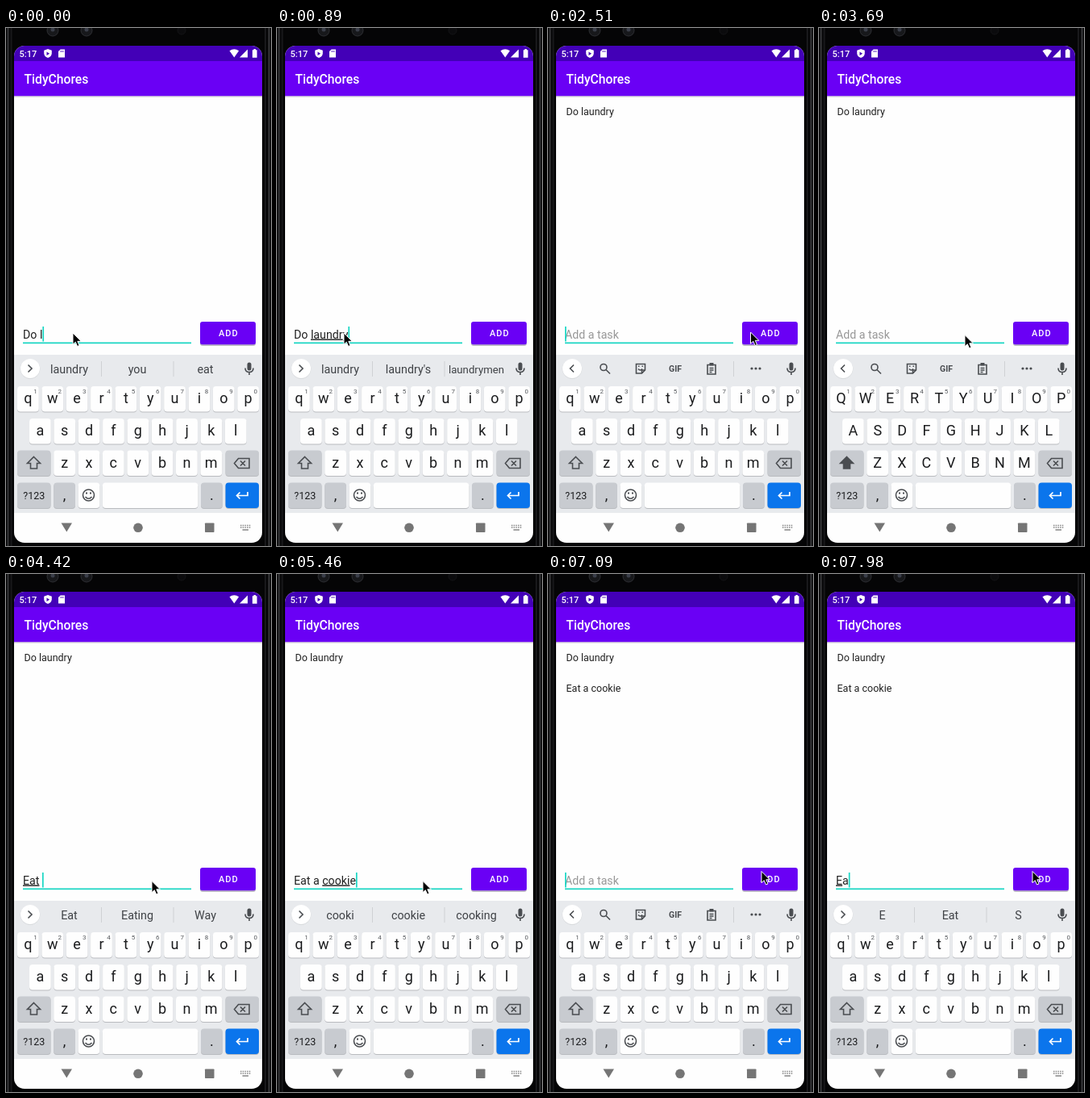
These frames come from a looping animation (329 px wide and 642 px high, 8000 ms). An HTML page:

```html
<!DOCTYPE html>
<html lang="en">
<head>
<meta charset="utf-8">
<title>To-do list demo</title>
<style>
  html, body { margin: 0; width: 100%; height: 100%; overflow: hidden; background: #000; }
  svg { display: block; width: 329px; height: 642px; font-family: Roboto, Arial, sans-serif; }
  text { white-space: pre; }
  .mid { text-anchor: middle; }
  .medium { font-weight: 500; }
  .under { text-decoration: underline; text-decoration-thickness: 1px; text-decoration-skip-ink: none; }
  .line { fill: none; stroke: #4a4d51; stroke-width: 1.6; }
  .key { font-size: 18px; fill: #1b1c1e; }
  .hint { font-size: 8px; fill: #55585c; }
  .word { font-size: 14.3px; fill: #3f4246; }
</style>
</head>
<body>
<svg viewBox="0 0 329 642">
  <defs>
    <clipPath id="screenClip"><rect x="10" y="22" width="308" height="616" rx="13"/></clipPath>
    <clipPath id="buttonClip"><rect x="241" y="364" width="69" height="28.5" rx="3"/></clipPath>
  </defs>

  <!-- phone body -->
  <rect width="329" height="642" fill="#050506"/>
  <path d="M2.5 0V642M326.5 0V642" stroke="#38393b" stroke-width="2"/>
  <path d="M6.5 0V642M322 0V642" stroke="#19191b" stroke-width="2"/>
  <g fill="#17181b" stroke="#2e2f33">
    <circle cx="58" cy="3" r="7"/><circle cx="100" cy="3" r="7"/>
    <circle cx="218" cy="3" r="5" fill="#0b0b0d" stroke="#141416"/>
  </g>
  <g fill="#3a3e49"><circle cx="58" cy="2" r="2.5"/><circle cx="100" cy="2" r="2.5"/></g>

  <g clip-path="url(#screenClip)">
    <rect x="10" y="22" width="308" height="616" fill="#fefefe"/>
    <rect x="10" y="22" width="308" height="19.5" fill="#4300b7"/>
    <rect x="10" y="41" width="308" height="43.5" fill="#6a00f5"/>
    <rect x="10" y="84.5" width="308" height="1" fill="#c9c5d0"/>

    <!-- status bar -->
    <g fill="#fff">
      <text x="16.5" y="35.5" font-size="11" class="medium">5:17</text>
      <path d="M52 26l4.8 1.8v3.4q0 4-4.8 5.8q-4.8-1.8-4.8-5.8v-3.4z"/>
      <path d="M67.600 26.500h5.400v10h-8v-7.400z"/>
      <path d="M277.500 28.300q5.800-4.300 11.600 0l-5.800 8.200z"/>
      <path d="M300 26.500v10h-10z"/>
      <path d="M307.500 26h2.500v1.200h1.600v9.600h-5.700v-9.600h1.600z"/>
    </g>
    <path d="M50.500 29.500l3.600 2.200-3.600 2.200z" fill="#4300b7"/>
    <path d="M67.800 28v2M69.500 28v2M71.200 28v2" stroke="#4300b7" stroke-width=".7"/>
    <text x="22.500" y="69" font-size="15.700" class="medium" fill="#fff">TidyChores</text>

    <!-- list and input -->
    <g font-size="12.500" fill="#212121">
      <text id="item1" x="22.500" y="108">Do laundry</text>
      <text id="item2" x="22.500" y="146">Eat a cookie</text>
    </g>
    <text id="placeholder" x="21" y="384.500" font-size="14.200" fill="#989898">Add a task</text>
    <text id="entry" x="21" y="384.500" font-size="14.200" fill="#212121"></text>
    <rect x="21" y="389.500" width="209" height="1.700" fill="#16d6c3"/>
    <rect id="caret" y="370" width="1.700" height="18.500" fill="#16d6c3"/>

    <rect id="shade" x="241" y="365.500" width="69" height="28.500" rx="3" fill="#bdbac4"/>
    <g clip-path="url(#buttonClip)">
      <rect x="241" y="364" width="69" height="28.500" fill="#6a00f5"/>
      <circle id="ripple" cy="378" fill="#fff" opacity=".24"/>
    </g>
    <text x="264" y="382.300" font-size="11" letter-spacing="1" class="medium" fill="#fff">ADD</text>

    <!-- keyboard -->
    <rect x="10" y="405" width="308" height="196" fill="#e8eaed"/>
    <circle cx="30" cy="422.500" r="12.300" fill="#d5d7da"/>
    <circle cx="30" cy="422" r="12" fill="#fff"/>
    <path id="chevron" class="line"/>
    <g id="words">
      <path d="M118.500 413v19M208 413v19" stroke="#cfd1d4"/>
      <text class="word mid" x="78.500" y="427.500"></text>
      <text class="word mid" x="163" y="427.500"></text>
      <text class="word mid" x="247.500" y="427.500"></text>
      <g id="cookie">
        <circle cx="163.300" cy="422.500" r="8" fill="#d99a52"/>
        <g fill="#754321">
          <circle cx="160" cy="419" r="1.500"/><circle cx="165" cy="417.500" r="1.200"/>
          <circle cx="167.500" cy="422" r="1.500"/><circle cx="162.500" cy="423.500" r="1.400"/>
          <circle cx="158.500" cy="425" r="1.100"/><circle cx="165" cy="427.500" r="1.400"/>
        </g>
      </g>
    </g>
    <g id="tools">
      <g class="line">
        <circle cx="69" cy="420.500" r="4"/><path d="M72 423.500l5 5"/>
        <path d="M109.500 416.500h11v7.500l-4 4h-7zM120.500 424h-4v4M112 422.500q2.500 3 5 0"/>
        <path d="M198 417.500h10v11.500h-10zM200.500 421.500h5M200.500 424h5M200.500 426.500h3"/>
      </g>
      <path d="M112 418.500h1.500v1.500h-1.500zM116.500 418.500h1.500v1.500h-1.500zM200.500 415h5v3.500h-5z" fill="#4a4d51"/>
      <text class="mid" x="158" y="426" font-size="10.500" font-weight="700" fill="#4a4d51">GIF</text>
      <path d="M230.500 413v19" stroke="#cfd1d4"/>
      <g fill="#4a4d51"><circle cx="253" cy="422" r="1.600"/><circle cx="258" cy="422" r="1.600"/><circle cx="263" cy="422" r="1.600"/></g>
    </g>
    <rect x="299.500" y="414.500" width="5" height="10" rx="2.500" fill="#4a4d51"/>
    <path class="line" d="M297 421.500q0 5 5 5q5 0 5-5M302 426.500v3.500"/>

    <g id="keys"></g>
    <path id="shift" class="line" d="M34.500 531.500l8 8h-4v6.500h-8v-6.500h-4z"/>
    <path class="line" d="M288.500 533.500h13.500v12h-13.500l-5-6zM291 536.500l6 6M297 536.500l-6 6"/>
    <g class="line"><circle cx="102.500" cy="579" r="7"/><path d="M98.500 581q4 4.500 8 0"/></g>
    <path d="M99 575.500h2v2h-2zM104 575.500h2v2h-2z" fill="#4a4d51"/>
    <path d="M300 575v4.500h-13M290.500 575.500l-4 4 4 4" fill="none" stroke="#fff" stroke-width="1.700"/>

    <!-- navigation bar -->
    <g fill="#757575">
      <path d="M68.500 613.500h13.500l-6.700 11z"/>
      <circle cx="164" cy="619.300" r="5.800"/>
      <rect x="247" y="613.500" width="11.500" height="11.500" rx=".7"/>
    </g>
    <path d="M291 616.500h12.500M291 619h12.500" stroke="#858585" stroke-width="1.500" stroke-dasharray="1.500 1.200"/>
    <path d="M293.500 622h7.500" stroke="#858585" stroke-width="1.500"/>
  </g>

  <path id="pointer" d="M0 0V14.200L3.300 11.200 5.600 16.500 8 15.500 5.800 10.300H10.300Z" fill="#000" stroke="#fff" stroke-width="1"/>
</svg>

<script>
const LOOP = 8000;
const $ = id => document.getElementById(id);

// Underscores enclose the part the keyboard is composing.
const typing = [
  [0, 'Do l'], [150, 'Do _l_a'], [290, 'Do _la_u'], [440, 'Do _lau_n'],
  [590, 'Do _laun_d'], [740, 'Do _laund_r'], [880, 'Do _laundr_y'], [1030, 'Do _laundry_'],
  [2210, ''], [3840, 'E'], [3980, '_E_a'], [4270, '_Ea_t'], [4420, '_Eat_ '],
  [4570, 'Eat a'], [4720, 'Eat _a_ '], [4870, 'Eat a c'], [5010, 'Eat a _c_o'],
  [5160, 'Eat a _coo_k'], [5310, 'Eat a _cook_i'], [5460, 'Eat a _cooki_e'],
  [5610, 'Eat a _cookie_'], [6940, ''], [7830, 'E'], [7980, '_E_a']
];

// An empty string shows the toolbar; an asterisk is the cookie emoji.
const suggestions = [
  [0, 'laundry you eat'], [150, 'l let love'], [290, 'la last lab'], [440, 'lau laundry laugh'],
  [590, 'laun laundry launch'], [740, 'laund laundry launder'], [880, "laundry laundry's laundrymen"],
  [2510, ''], [3980, 'E Eat S'], [4270, 'Ea Eat East'], [4420, 'Eat Eating Way'],
  [4570, 'at the a'], [4720, 'a A at'], [4870, 'lot little good'], [5010, 'c can cake'],
  [5160, 'co come cookie'], [5310, 'cook cookie cooking'], [5460, 'cooki cookie cooking'],
  [5610, 'cookie * Cookie'], [7090, ''], [7980, 'E Eat S']
];

const pointerPath = [
  [0, 83, 378], [1030, 106, 367], [1180, 142, 359], [1330, 182, 357], [1470, 220, 362],
  [1620, 245, 372], [1770, 253.500, 377], [2060, 251.500, 377], [2660, 243, 379],
  [2800, 222, 381], [2950, 197, 381], [3100, 181, 380.500],
  [5760, 188, 379], [5900, 213, 375], [6060, 247, 370], [6210, 265, 368.500]
];

const caretOff = [[1470, 2210], [2800, 3240], [3690, 3840], [6060, 6510], [7390, 7830]];
const presses = [[2060, 2210, 30], [2210, 2510, 75], [6800, 6940, 30], [6940, 7090, 75]];

const stepAt = (table, t) => table.findLast(row => row[0] <= t);
const spanAt = (spans, t) => spans.find(([from, to]) => t >= from && t < to);
const show = (id, on) => $(id).style.display = on ? '' : 'none';

function add(parent, tag, attrs, text = '') {
  const el = document.createElementNS('http://www.w3.org/2000/svg', tag);
  for (const name in attrs) el.setAttribute(name, attrs[name]);
  el.textContent = text;
  parent.append(el);
  return el;
}

function addKey(x, y, width, fill, label = '', baseline = 21, size = 18) {
  const box = { x, width, height: 31.500, rx: 4 };
  add($('keys'), 'rect', { ...box, y: y + 1, fill: '#b9bbbf' });
  add($('keys'), 'rect', { ...box, y, fill });
  return add($('keys'), 'text', { class: 'key mid', x: x + width / 2, y: y + baseline, style: `font-size:${size}px` }, label);
}

const PITCH = 30.360, GREY = '#c8cbd0', WHITE = '#fefefe';
const letters = [];
[['qwertyuiop', 14, 444], ['asdfghjkl', 29, 484], ['zxcvbnm', 59.200, 523.500]].forEach(([row, left, y], r) => {
  [...row].forEach((letter, i) => {
    const x = left + i * PITCH;
    letters.push([letter, addKey(x, y, 26.800, WHITE, letter)]);
    if (!r) add($('keys'), 'text', { class: 'hint mid', x: x + 22.500, y: y + 9 }, (i + 1) % 10);
  });
});
addKey(14, 523.500, 41.500, GREY);
addKey(272.500, 523.500, 41.500, GREY);
addKey(14, 563.500, 41.500, GREY, '?123', 20, 12.500);
addKey(59.200, 563.500, 26.800, GREY, ',');
addKey(89.500, 563.500, 26.800, WHITE);
addKey(119.800, 563.500, 118.500, WHITE);
addKey(242, 563.500, 26.800, GREY, '.');
addKey(272.500, 563.500, 41.500, '#0b75ec');

const slots = document.querySelectorAll('#words text');
let shownText, shownWords, shownCaps;

function setEntry(text) {
  if (text === shownText) return;
  shownText = text;
  const entry = $('entry');
  entry.textContent = '';
  text.split('_').forEach((part, i) => {
    if (part) add(entry, 'tspan', i === 1 ? { class: 'under' } : {}, part);
  });
  show('placeholder', !text);
  $('caret').setAttribute('x', 21 + (text ? entry.getComputedTextLength() : 0));
}

function setWords(words) {
  if (words === shownWords) return;
  shownWords = words;
  show('words', words);
  show('tools', !words);
  show('cookie', words.includes('*'));
  $('chevron').setAttribute('d', words ? 'M27.500 417.500l4.500 4.500-4.500 4.500' : 'M32 417.500l-4.500 4.500 4.500 4.500');
  words.split(' ').forEach((word, i) => {
    slots[i].textContent = word === '*' ? '' : word;
    slots[i].style.fontSize = word.length > 9 ? '13.200px' : '';
  });
}

function setCaps(caps) {
  if (caps === shownCaps) return;
  shownCaps = caps;
  for (const [letter, el] of letters) el.textContent = caps ? letter.toUpperCase() : letter;
  $('shift').style.fill = caps ? '#4a4d51' : 'none';
}

function draw(t) {
  setEntry(stepAt(typing, t)[1]);
  setWords(stepAt(suggestions, t)[1]);
  setCaps(t >= 3690 && t < 3840);
  show('caret', !spanAt(caretOff, t));
  show('item1', t >= 2510);
  show('item2', t >= 7090);

  const [, x, y] = stepAt(pointerPath, t);
  $('pointer').setAttribute('transform', `translate(${x} ${y})`);

  const press = spanAt(presses, t);
  $('ripple').setAttribute('cx', x);
  $('ripple').setAttribute('r', press ? press[2] : 0);
  $('shade').setAttribute('y', press ? 367.500 : 365.500);
}

function tick() {
  draw(performance.now() % LOOP);
  requestAnimationFrame(tick);
}
tick();
</script>
</body>
</html>
```
